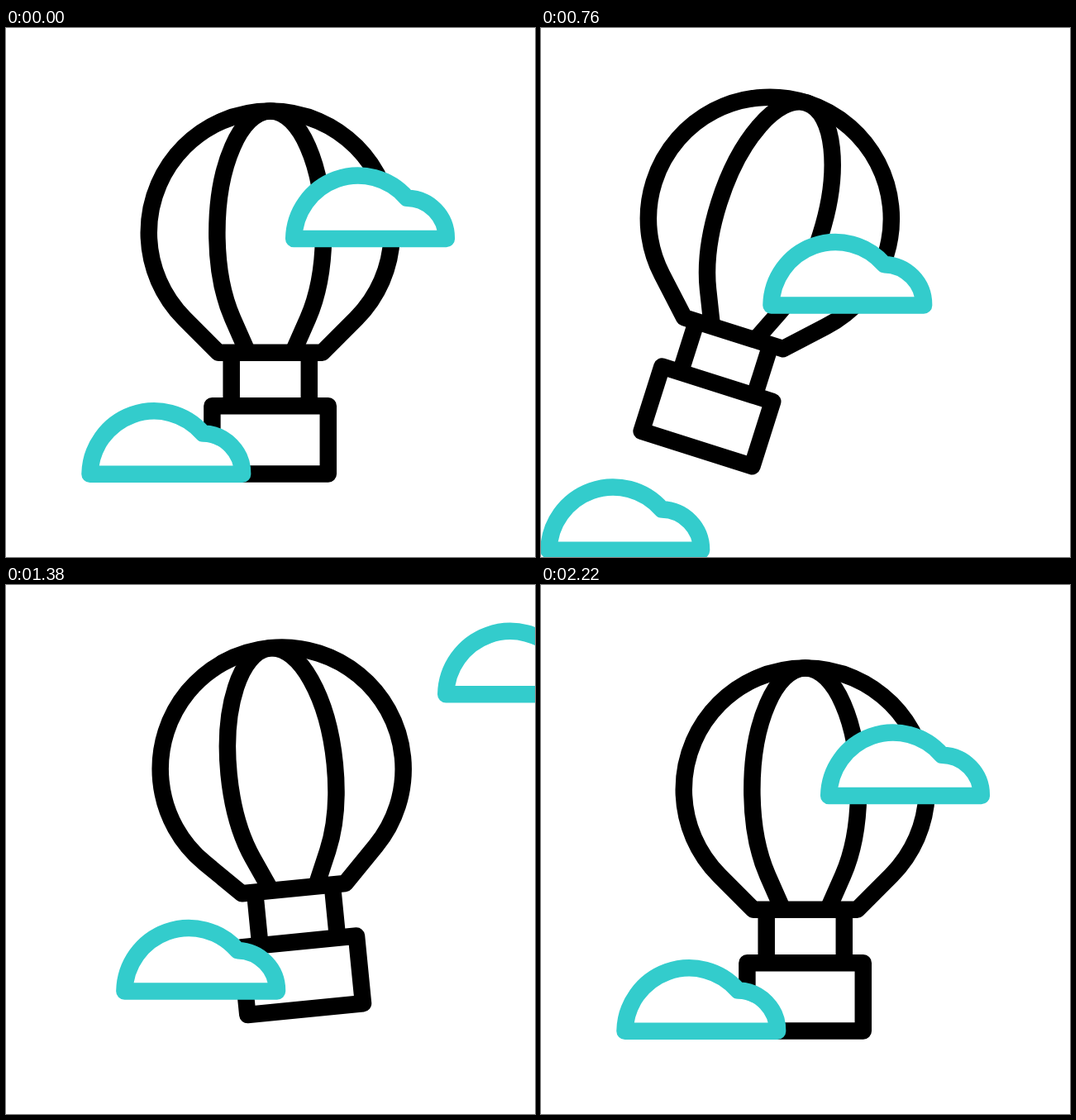
An HTML page that plays this animation: 640x640 px, repeating every 2400 ms.

```html
<!DOCTYPE html>
<html lang="en">
<head>
<meta charset="utf-8">
<title>Hot air balloon</title>
<style>
  html, body { margin: 0; width: 100%; height: 100%; overflow: hidden; background: #fff; }
  svg { display: block; width: 100vw; height: 100vh; }
</style>
</head>
<body>
<svg viewBox="0 0 640 640" fill="none" stroke-width="20.5" stroke-linejoin="round">
  <defs>
    <path id="cloud" d="M348.2 255A77.8 77.8 0 0 1 485 205.7A48.6 48.6 0 0 1 532.8 255Z"/>
  </defs>
  <g id="balloon" stroke="#000">
    <path d="M257 392.7L215.8 351.4A147 147 0 1 1 423.7 351.4L382.5 392.7Z"/>
    <path d="M291.2 390L274.2 351.4A64.4 147 0 1 1 365.3 351.4L348.3 390"/>
    <path d="M272.7 392V457M366.8 392V457"/>
    <path d="M249.4 457.3H389.8V539.4H249.4Z"/>
  </g>
  <g stroke="#3cc" fill="#fff">
    <use id="leaving" href="#cloud"/>
    <use id="crossing" href="#cloud"/>
    <use id="entering" href="#cloud"/>
  </g>
</svg>
<script>
const LOOP = 2400;
const LOW = [-246.7, 284.8];   // lower resting place, relative to the upper one
const [balloon, leaving, crossing, entering] =
  ['balloon', 'leaving', 'crossing', 'entering'].map(id => document.getElementById(id));

// Ease with flat ends; a and b are the x positions of the two handles.
const ease = (a, b) => u => {
  let lo = 0, hi = 1, s;
  for (let i = 0; i < 24; i++) {
    s = (lo + hi) / 2;
    const x = 3 * a * s * (1 - s) ** 2 + 3 * b * s * s * (1 - s) + s ** 3;
    if (x < u) lo = s; else hi = s;
  }
  return s * s * (3 - 2 * s);
};
const soft = ease(1 / 3, 2 / 3), brisk = ease(1 / 6, 5 / 6), lift = ease(.25, .7);

const progress = (t, from, to, curve = soft) =>
  curve(Math.min(1, Math.max(0, (t - from) / (to - from))));

// Sum of eased steps between [time, value] keys.
const track = (t, keys) => keys.slice(1).reduce(
  (v, [time, value], i) => v + (value - keys[i][1]) * progress(t, keys[i][0], time), keys[0][1]);

const swing = [[200, 0], [800, 17.8], [1400, -5.7], [1800, 3.95], [2200, 0]];

const move = (el, x, y, extra = '') => el.setAttribute('transform', `translate(${x} ${y})${extra}`);

function draw(now) {
  const t = now % LOOP;

  const rise = -26 * (progress(t, 200, 1600, lift) - progress(t, 1600, 2200));
  move(balloon, 0, rise, ` rotate(${track(t, swing)} 319.75 105.5)`);

  const out = 204 * progress(t, 200, 1400);
  move(leaving, LOW[0] - out, LOW[1] + out);

  const across = progress(t, 200, 1800);
  move(crossing, LOW[0] * across, LOW[1] * across);

  const left = 316 * (1 - progress(t, 760, 2200, brisk));
  move(entering, left, -left * 2 / 3);
  entering.style.display = t < 760 ? 'none' : '';
}

const start = performance.now();
function tick() {
  draw(performance.now() - start);
  requestAnimationFrame(tick);
}
tick();
</script>
</body>
</html>
```
